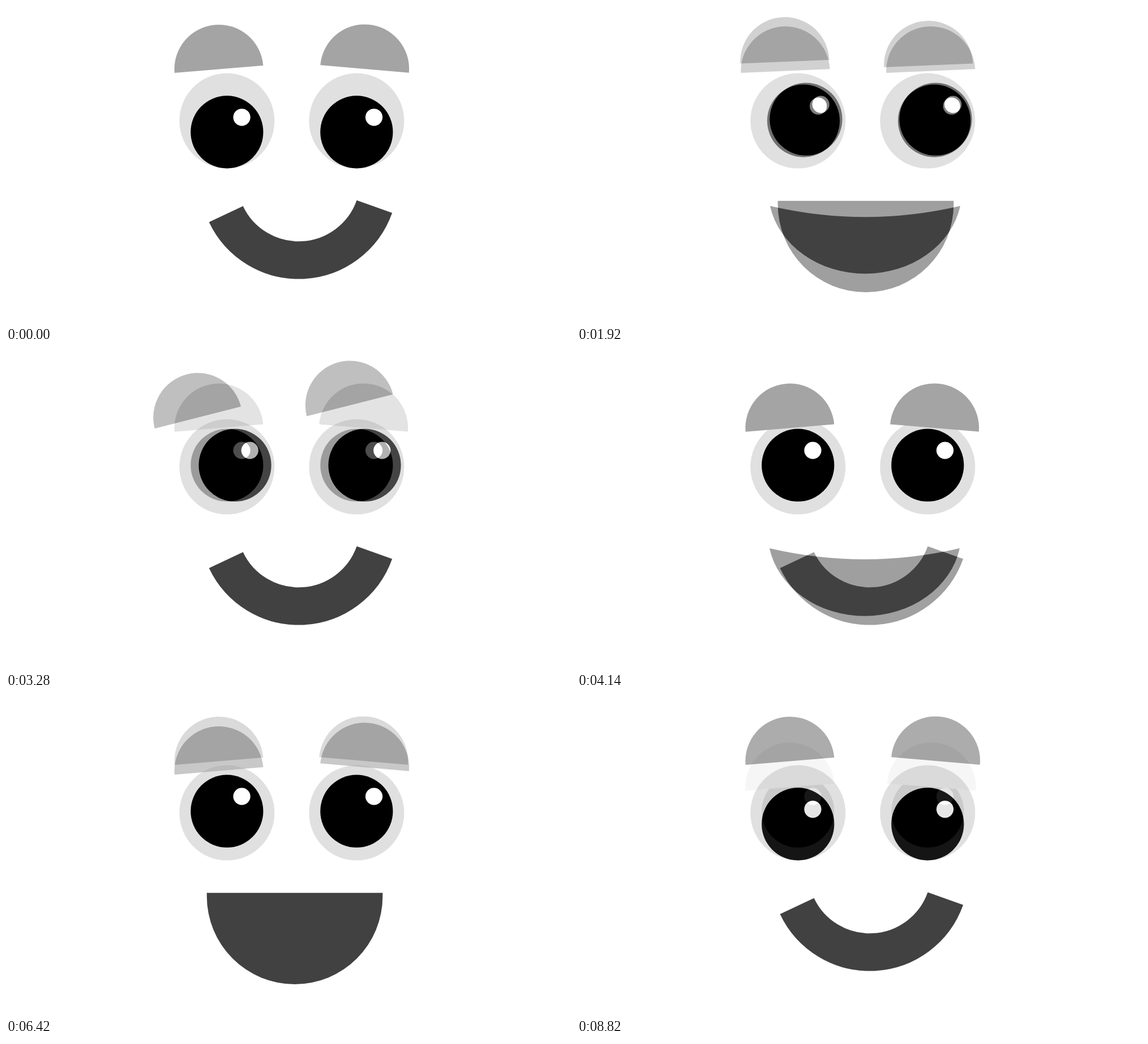
Recreate the animation shown at these times as an HTML page. Size 998x561 px, loop 8.88 s.

```html
<!DOCTYPE html>
<html lang="en">
<head>
<meta charset="utf-8">
<title>Face</title>
<style>
html, body { margin: 0; height: 100%; overflow: hidden; background: #fff; }
svg { display: block; width: 100%; height: 100%; }
</style>
</head>
<body>
<svg id="stage" viewBox="0 0 998 561"></svg>
<script>
const HOLD = 200, STEP = 60, STEPS = 10;
const BEAT = HOLD + STEP * (STEPS - 1);
const EYES = [390.3, 619.3], EYE_Y = 202.6;

const grin = (x, y) =>
  `<path fill="#414141" d="M${x} ${y}q168 39 336 0a171 147 0 0 1 -336 0z"/>`;

const polar = deg => {
  const a = deg * Math.PI / 180;
  return `${517 + 142 * Math.cos(a)} ${306.4 + 142 * Math.sin(a)}`;
};
const mouths = {
  smile: `<path fill="none" stroke="#414141" stroke-width="66.4"
    d="M${polar(19.55)}A142 142 0 0 1 ${polar(154.7)}"/>`,
  open: '<path fill="#414141" d="M354.7 343.7H665.3V349.7A155.3 155.3 0 0 1 354.7 349.7z"/>',
  grinLow: grin(341, 352.7),
  grin: grin(340, 346.2)
};

// look: pupil offsets [left x, right x, y]; brows: [x, y, tilt] of each flat edge's middle
const changes = [
  { look: [0, 0, 19.8], mouth: 'smile', left: [376, 111.5, -4.8], right: [633.5, 111, 5] },
  { look: [0, 0, 0], mouth: 'open', left: [358.8, 108, -22.4], right: [651, 105.5, 13.6] },
  { look: [9.7, 11.7, 0], mouth: 'grinLow', left: [368, 114.6, -2.4], right: [624.7, 114.6, -2.4] },
  { look: [14.2, 14.2, -2.9], mouth: 'open', left: [367, 98.2, -2.4], right: [620.7, 104.7, -2.4] },
  { mouth: 'smile', left: [338.8, 115.6, -14.3], right: [607.4, 94, -14.1] },
  { look: [0, 0, -2.9], left: [376, 134.2, -4.8], right: [631.5, 134, 4.8] },
  { mouth: 'grin' },
  { left: [376, 111.5, -4.8], right: [631.5, 111, 5] },
  { mouth: 'open' },
  { left: [376, 128.6, -4.8], right: [633.5, 122.2, 5] },
  { mouth: 'smile' },
  { left: [376, 157.2, -4.6], right: [626, 157, 4.6] }
];

const circle = (x, y, r, fill) => `<circle cx="${x}" cy="${y}" r="${r}" fill="${fill}"/>`;

const brow = ([x, y, tilt]) =>
  `<path fill="#a4a4a4" transform="translate(${x} ${y}) rotate(${tilt})"
    d="M-78.6 0A78.6 78.6 0 0 1 78.6 0z"/>`;

const eye = (side, look) => {
  const x = EYES[side] + look[side], y = EYE_Y + look[2];
  return circle(EYES[side], EYE_Y, 84, '#e0e0e0') +
    circle(x, y, 64.1, '#000') +
    circle(x + [26.2, 30.7][side], y - 26.1, 15.1, '#fff');
};

const face = p => `<g><rect width="998" height="561" fill="#fff"/>` +
  eye(0, p.look) + eye(1, p.look) + mouths[p.mouth] + brow(p.left) + brow(p.right) + '</g>';

let pose = {};
const poses = changes.map(change => pose = { ...pose, ...change });
const stage = document.getElementById('stage');
stage.innerHTML = [...poses, poses[0]].map(face).join('');
const layers = [...stage.children];

// Each face dissolves in stepwise on top of the one before it
function draw() {
  const t = performance.now() % (BEAT * poses.length);
  layers.forEach((layer, i) => {
    if (!i) return;
    const start = (i - 1) * BEAT + HOLD;
    const step = Math.floor((t - start) / STEP) + 1;
    layer.setAttribute('opacity', Math.min(Math.max(step, 0), STEPS) / STEPS);
  });
  requestAnimationFrame(draw);
}
draw();
</script>
</body>
</html>
```
